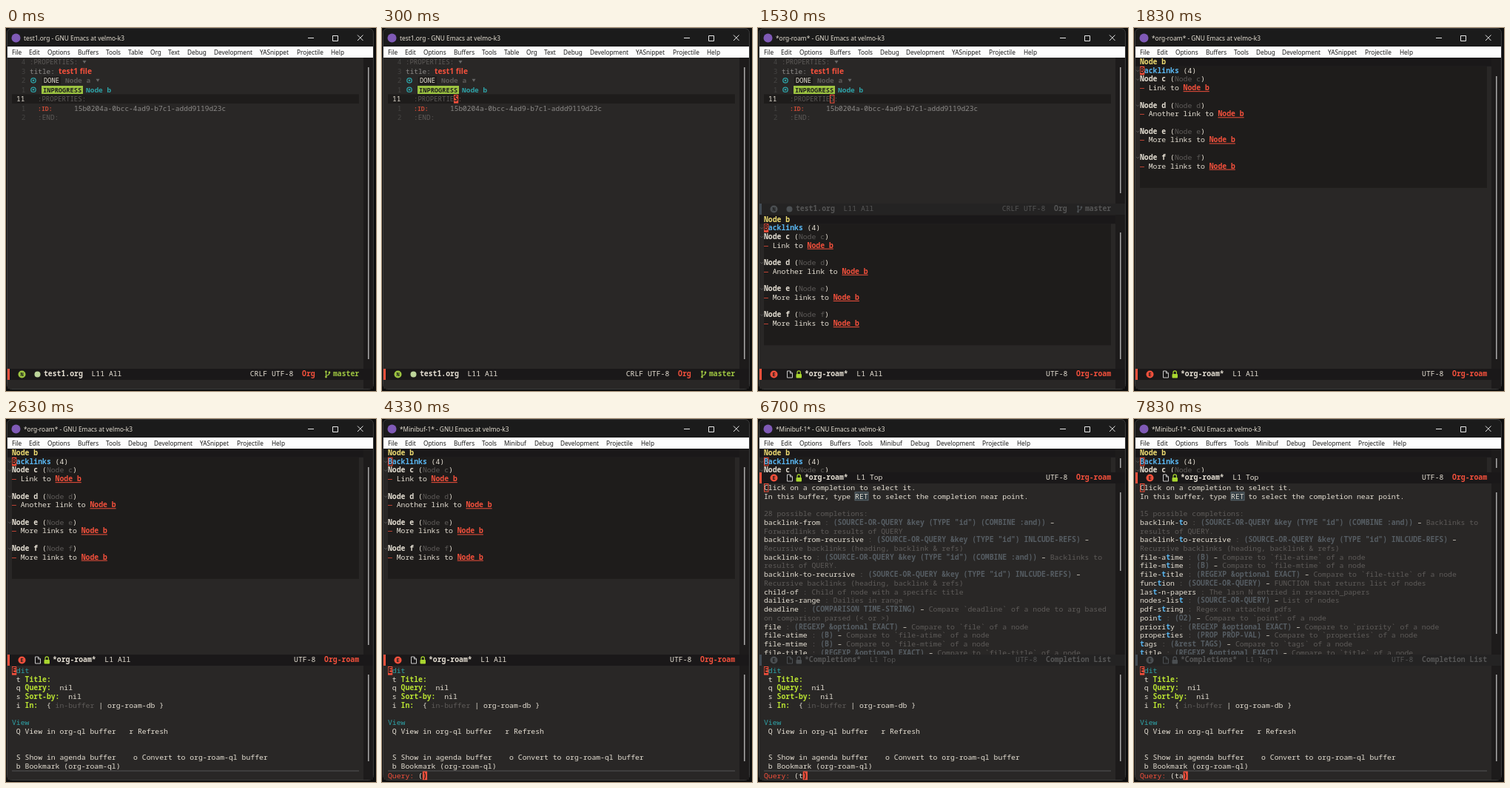
Animation, 500 px wide and 490 px high, one loop 8 s. Source, as an HTML page:

```html
<!DOCTYPE html>
<html lang="en">
<head>
<meta charset="utf-8">
<title>Editor session</title>
<style>
html, body { margin: 0; width: 100%; height: 100%; overflow: hidden; background: #0d0d0d; }
svg { display: block; }
text { white-space: pre; font-variant-ligatures: none; }
.mono { font-family: "Noto Sans Mono", "DejaVu Sans Mono", monospace; }
.ui { font-family: "Noto Sans", "Open Sans", sans-serif; }
</style>
</head>
<body>
<svg id="stage" width="500" height="490" viewBox="0 0 500 490"></svg>
<script>
const LOOP = 8000, CW = 5.86, LH = 11.72, SIZE = 9.77;
const RED = '#f4503c', GREEN = '#9dc441', BG = '#292726', DARK = '#1e1c1b', BAR = '#1a1819';

// Upper case codes are bold.
const COLORS = {
  w: '#e6e0d4', g: '#5e5b59', d: '#555555', r: RED, l: RED, y: '#f0dd72', b: '#58b4ee',
  c: '#2ea3a8', n: '#b9e232', s: '#565d63', k: '#1c1c1c', a: '#8c8a88', i: '#454443', v: GREEN, p: '#c54a36'
};
const SEP = '§';

const esc = s => s.replace(/&/g, '&amp;').replace(/</g, '&lt;');
const rect = (x, y, w, h, fill, extra = '') =>
  `<rect x="${x}" y="${y}" width="${w}" height="${h}" fill="${fill}" ${extra}/>`;
const path = (d, stroke, width = 1) =>
  `<path d="${d}" fill="none" stroke="${stroke}" stroke-width="${width}"/>`;
const dot = (x, y, r, fill) => `<circle cx="${x}" cy="${y}" r="${r}" fill="${fill}"/>`;

function text(x, y, marked, size = SIZE, cls = 'mono') {
  const spans = marked.split(SEP).slice(1).map(part => {
    const code = part[0], low = code.toLowerCase();
    return `<tspan fill="${COLORS[low]}"${code !== low ? ' font-weight="700"' : ''}` +
      `${low === 'l' ? ' text-decoration="underline"' : ''}>${esc(part.slice(1))}</tspan>`;
  });
  return `<text class="${cls}" x="${x}" y="${y}" font-size="${size}">${spans.join('')}</text>`;
}

const lines = (top, rows) => rows.map((row, i) => row ? text(8, top + 9 + i * LH, row) : '').join('');

function cursor(x, top, ch, style) {
  if (style === 'solid') return rect(x, top, 6.2, 11.6, RED) + text(x, top + 9, '§K' + ch);
  if (style === 'hollow') return rect(x + .5, top + .5, 5.4, 10.6, 'none', `stroke="${RED}"`);
  return '';
}

const thumb = (from, to) => rect(489, from, 1.6, to - from, '#a2a2a2');

// ---- window frame ----
const MENUS = {
  org: ['Table 165', 'Org 195', 'Text 219', 'Debug 245', 'Development 281', 'YASnippet 343', 'Projectile 393', 'Help 439'],
  roam: ['Debug 165', 'Development 200', 'YASnippet 262', 'Projectile 312', 'Help 359'],
  mini: ['Minibuf 165', 'Debug 206', 'Development 241', 'Projectile 303', 'Help 350']
};
const TITLES = { org: 'test1.org', roam: '*org-roam*', mini: '*Minibuf-1*' };

function frame(focus) {
  const items = ['File 8', 'Edit 31', 'Options 56', 'Buffers 97', 'Tools 135', ...MENUS[focus]];
  return rect(1.5, .5, 495, 487, '#1b1b1b', 'rx="6" stroke="#3c3c3c"') +
    dot(13.5, 13.5, 6, '#7f5ab6') +
    text(24, 17, `§w${TITLES[focus]} - GNU Emacs at velmo-k3`, 8.35, 'ui') +
    path('M408 13.5H416M441.5 10.5H448.5V17.5H441.5ZM475 9.5L482.5 17M482.5 9.5L475 17', '#e8e8e8') +
    rect(2, 25, 494, 15, '#fdfdfd') +
    items.map(item => {
      const [label, x] = item.split(' ');
      return text(x, 35.8, '§k' + label, 8.25, 'ui');
    }).join('') +
    rect(2, 40, 481, 447, BG) + rect(483, 40, 13, 447, '#1d1b1b');
}

// ---- status lines ----
function statusLine(cy, active, name, pos, enc, mode, org) {
  const nameX = org ? 51 : 63, base = cy + 3.3, end = org ? 417.6 : 477;
  const modeX = end - mode.length * CW, encX = modeX - (enc.length + 2) * CW;
  const fg = active ? 'w' : 'd', gray = '#4b4f52';
  const tint = c => active ? c : gray;
  let out = rect(2, cy - 7, 494, 15, active ? BAR : '#242323') +
    rect(2, cy - 7, 3, 15, active ? RED : '#414b53') +
    dot(21.5, cy + .5, 5, tint(org ? GREEN : RED)) +
    text(19.4, cy + 3.2, `§K${org ? 'N' : 'E'}`, 7) +
    text(nameX, base, `§${fg.toUpperCase()}${name}`) +
    text(nameX + (name.length + 2) * CW, base, `§${fg}${pos}`) +
    text(encX, base, `§${fg}${enc}`) +
    text(modeX, base, `§${active ? 'R' : 'D'}${mode}`);
  if (org) {
    out += dot(42.5, cy + .5, 4, tint('#bcd49a')) +
      path(`M432.5 ${cy - 3}V${cy + 4}M432.5 ${cy + 2}Q437 ${cy + 2} 437 ${cy - 2}`, tint(GREEN), 1.2) +
      dot(432.5, cy - 3, 1.4, tint(GREEN)) + dot(432.5, cy + 4, 1.4, tint(GREEN)) + dot(437, cy - 2, 1.4, tint(GREEN)) +
      text(442, base, `§${active ? 'V' : 'D'}master`);
  } else {
    out += path(`M39.5 ${cy - 4}H43.5L46.5 ${cy - 1}V${cy + 5}H39.5ZM43.5 ${cy - 4}V${cy - 1}H46.5`, tint('#c8c8c8')) +
      rect(51.5, cy, 7.5, 5.5, tint('#a9d62f'), 'rx="1"') +
      path(`M53 ${cy}V${cy - 2}A2.2 2.2 0 0 1 57.4 ${cy - 2}V${cy}`, tint('#a9d62f'), 1.2);
  }
  return out;
}
const orgStatus = (cy, on) => statusLine(cy, on, 'test1.org', 'L11 All', 'CRLF UTF-8', 'Org', true);
const roamStatus = (cy, on, pos = 'L1 All') => statusLine(cy, on, '*org-roam*', pos, 'UTF-8', 'Org-roam');

// ---- buffers ----
function orgBuffer(cursorStyle) {
  const base = row => 49.4 + row * 12.45;
  const nums = ['4', '3', '2', '1', '', '1', '2'].map((n, i) => text(20.8, base(i), '§i' + n, 9.5)).join('') +
    text(14, base(4), '§w11', 9.5);
  const fold = (x, row) =>
    `<path d="M${x} ${base(row) - 5.5}h5l-2.5 4z" fill="#666"/>`;
  const bullet = row => `<circle cx="37" cy="${base(row) - 3.5}" r="3.2" fill="none" stroke="#2ea3a8" stroke-width="1.3"/>` +
    dot(37, base(row) - 3.5, 1.3, '#2ea3a8');
  return rect(8, 89.5, 469, 12.5, DARK) + nums +
    text(32, base(0), '§g:PROPERTIES:', 9.05) + fold(103.5, 0) +
    text(32, base(1), '§atitle:', 9.4) + text(71, base(1), '§Rtest1 file', 10.3, 'ui') +
    bullet(2) + rect(49, 65.5, 25, 11, DARK) + text(51, base(2) - .2, '§wDONE', 8.75) +
    text(80, base(2), '§GNode a', 9.5) + fold(121.5, 2) +
    bullet(3) + rect(48, 78, 56, 11, GREEN) + text(50, base(3) - .2, '§KINPROGRESS', 8.7) +
    text(108, base(3), '§CNode b', 9.5) +
    text(43, base(4), '§g:PROPERTIES:', 9.05) +
    text(43, base(5), '§P:ID:', 8.2) +
    text(92, base(5), '§a15b0204a-0bcc-4ad9-b7c1-addd9119d23c', 9.5) +
    text(43, base(6), '§g:END:', 9.4) +
    cursor(97, 90, 'S', cursorStyle);
}

const NODES = [['c', 'Link'], ['d', 'Another link'], ['e', 'More links'], ['f', 'More links']];
const ROAM_ROWS = ['§YNode b', '§BBacklinks§w (4)', ...NODES.flatMap(([id, label]) =>
  [`§WNode ${id}§w (§gNode ${id}§w)`, `§r— §w${label} to §LNode b`, ''])];

function roamBuffer(top, cursorStyle, count = 15) {
  const shown = ROAM_ROWS.slice(0, count);
  const folds = shown.map((row, i) => i === 1 || i % 3 === 2
    ? path(`M3 ${top + 5 + i * LH}l2 2l2-2`, '#555') : '').join('');
  return rect(2, top, 481, LH, BAR) +
    rect(8, top + LH, 469, (count - 1) * LH, DARK) +
    folds + lines(top, shown) + cursor(8, top + LH, 'B', cursorStyle);
}

const TRANSIENT = [
  '§cEdit', '§w t §NTitle:', '§w q §NQuery:§w  nil', '§w s §NSort-by:§w  nil',
  '§w i §NIn:§w  { §gin-buffer§w | org-roam-db }', '', '§cView',
  '§w Q View in org-ql buffer   r Refresh', '', '',
  '§w S Show in agenda buffer    o Convert to org-roam-ql buffer',
  '§w b Bookmark (org-roam-ql)'
];
const transient = () => lines(334, TRANSIENT) + cursor(8, 334, 'E', 'solid') +
  rect(8, 474.5, 469, 1, '#555') + thumb(345, 462);

const entry = (name, sig, desc) => `§w${name}§g : ` + (sig ? `§S${sig}§w – ` : '') + `§g${desc}`;
const KEYS = '(SOURCE-OR-QUERY &key (TYPE "id") ';
const AND = KEYS + '(COMBINE :and))', REFS = KEYS + 'INLCUDE-REFS)', EXACT = '(REGEXP &optional EXACT)';
const RECURSIVE = '§gRecursive backlinks (heading, backlink & refs)';
const compare = (name, sig) => [name, sig, `Compare to \`${name}\` of a node`];

const BACK_TO = ['backlink-to', AND, 'Backlinks to'];
const BACK_TO_REC = ['backlink-to-recursive', REFS, ''];
const FILES = [compare('file-atime', '(B)'), compare('file-mtime', '(B)'), compare('file-title', EXACT)];
const ALL = [
  ['backlink-from', AND, ''], '§gForwardlinks to results of QUERY',
  ['backlink-from-recursive', REFS, ''], RECURSIVE,
  BACK_TO, '§gresults of QUERY.', BACK_TO_REC, RECURSIVE,
  ['child-of', '', 'Child of node with a specific title'],
  ['dailies-range', '', 'Dailies in range'],
  ['deadline', '(COMPARISON TIME-STRING)', 'Compare `deadline` of a node to arg based'],
  '§gon comparison parsed (< or >)',
  compare('file', EXACT), ...FILES
];
const MATCHING = [
  BACK_TO, '§gresults of QUERY.', BACK_TO_REC, RECURSIVE, ...FILES,
  ['function', '(SOURCE-OR-QUERY)', 'FUNCTION that returns list of nodes'],
  ['last-n-papers', '', 'The lasn N entried in research_papers'],
  ['nodes-list', '(SOURCE-OR-QUERY)', 'List of nodes'],
  ['pdf-string', '', 'Regex on attached pdfs'],
  compare('point', '(O2)'), compare('priority', EXACT),
  ['properties', '(PROP PROP-VAL)', 'Compare to `properties` of a node'],
  compare('tags', '(&rest TAGS)'), compare('title', EXACT)
];

function completions(filtered) {
  const rows = (filtered ? MATCHING : ALL).map(item => {
    if (typeof item === 'string') return item;
    const [name, sig, desc] = item;
    return entry(filtered ? name.replace('t', '§Bt§w') : name, sig, desc);
  });
  return rect(131, 98.8, 18, 11, '#2f3a40', 'stroke="#66757d" stroke-width=".8"') +
    lines(87, ['§wClick on a completion to select it.',
      '§wIn this buffer, type RET to select the completion near point.', '',
      `§g${filtered ? 15 : 28} possible completions:`, ...rows]) +
    cursor(8, 87, 'C', 'hollow') + thumb(99, filtered ? 290 : 205) +
    statusLine(325, false, '*Completions*', 'L1 Top', 'UTF-8', 'Completion List');
}

function prompt(input, closed, on) {
  const x = 8 + (7 + input.length) * CW;
  return text(8, 484.6, `§rQuery: §w${input}${closed ? ')' : ''}`) +
    cursor(x, 475.6, closed ? ')' : ' ', on ? 'solid' : '');
}

// ---- timeline ----
const within = (t, ...spans) => spans.some(([a, b]) => t >= a && t < b);

function queryInput(t) {
  if (t < 4200) return '';
  if (t >= 7830) return '(ta';
  return within(t, [5030, 5530], [6530, 7830]) ? '(t' : '(';
}

function scene(t) {
  if (t < 370) return frame('org') + orgBuffer(t < 30 ? '' : 'solid') + thumb(53, 447) + orgStatus(467, true);
  if (t < 1730) {
    const inOrg = t < 1500;
    const orgCursor = !inOrg ? 'hollow' : within(t, [870, 1370]) ? '' : 'solid';
    return frame(inOrg ? 'org' : 'roam') + orgBuffer(orgCursor) + thumb(53, 223) + orgStatus(244, inOrg) +
      roamBuffer(252.5, inOrg ? 'hollow' : 'solid') + thumb(276, 447) + roamStatus(467, !inOrg);
  }
  const mini = t >= 3530;
  const style = mini ? 'hollow' : within(t, [2230, 2630], [3130, 3530]) ? '' : 'solid';
  const top = frame(mini ? 'mini' : 'roam');
  if (t < 2630) return top + roamBuffer(40, style) + thumb(65, 447) + roamStatus(467, true);

  const hidden = within(t, [4030, 4200], [4700, 5030], [6300, 6530], [7600, 7830]);
  const upper = t < 5800
    ? roamBuffer(40, style) + thumb(65, 305) + roamStatus(325, true)
    : roamBuffer(40, style, 3) + thumb(53, 66) + roamStatus(79, true, 'L1 Top') + completions(t >= 7100);
  return top + upper + transient() + (mini ? prompt(queryInput(t), t >= 4200, !hidden) : '');
}

const stage = document.getElementById('stage');
const start = performance.now();
let drawn = '';
function tick() {
  const next = scene((performance.now() - start) % LOOP);
  if (next !== drawn) stage.innerHTML = drawn = next;
  requestAnimationFrame(tick);
}
tick();
</script>
</body>
</html>
```
